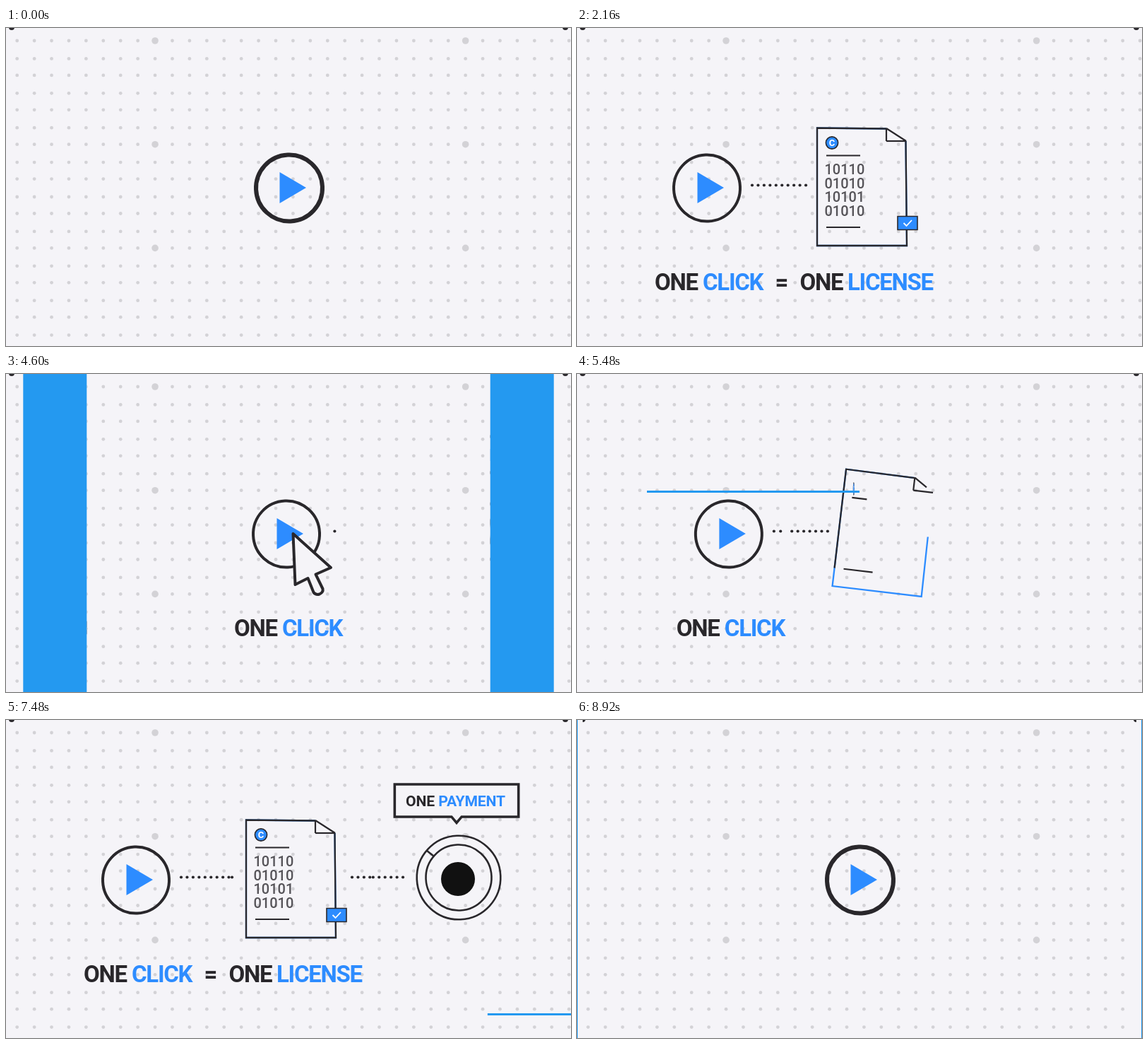
Recreate the animation shown at these times as an HTML page with a canvas. Size 800 px wide and 450 px high, loop 8960 ms.

```html
<!DOCTYPE html>
<html lang="en">
<head>
<meta charset="utf-8">
<title>One click</title>
<style>
html, body { margin: 0; width: 800px; height: 450px; overflow: hidden; background: #f5f4f8 }
canvas { display: block }
</style>
</head>
<body>
<canvas id="stage" width="800" height="450"></canvas>
<script>
const c = document.getElementById('stage').getContext('2d');
const LOOP = 8960, CYCLE = 4000, WIPE = 3910;
const BG = '#f5f4f8', INK = '#29272b', BLUE = '#2d8cff', BAR = '#2499f0', GREY = '#d3d2d6';

const clamp = (v, a = 0, b = 1) => Math.min(b, Math.max(a, v));
const span = (t, from, to) => clamp((t - from) / (to - from));
const quad = u => u < .5 ? 2 * u * u : 1 - 2 * (1 - u) ** 2;
const out = u => 1 - (1 - u) ** 3;

function disc(x, y, r, color) {
  c.fillStyle = color;
  c.beginPath();
  c.arc(x, y, r, 0, 7);
  c.fill();
}

function trace(points) {
  c.beginPath();
  points.forEach(p => c.lineTo(...p));
}

function stroke(width, color = INK) {
  c.lineWidth = width;
  c.strokeStyle = color;
  c.stroke();
}

function line(x1, y1, x2, y2, width, color) {
  if (x1 === x2 && y1 === y2) return;
  trace([[x1, y1], [x2, y2]]);
  stroke(width, color);
}

function ring(x, y, r, width, part = 1) {
  if (!part) return;
  c.beginPath();
  c.arc(x, y, r, -2.4, -2.4 + part * 2 * Math.PI);
  stroke(width);
}

function label(text, x, y, color, size = 33, gap = -1.3, weight = 700) {
  c.font = `${weight} ${size}px Roboto, sans-serif`;
  c.letterSpacing = gap + 'px';
  c.fillStyle = color;
  c.fillText(text, x, y);
}

// Runs draw in a frame moved to x, y, then scaled and turned
function at(x, y, sx, sy, angle, draw) {
  if (!sx || !sy) return;
  c.save();
  c.translate(x, y);
  c.rotate(angle);
  c.scale(sx, sy);
  draw();
  c.restore();
}

const typed = (text, u) => text.slice(0, Math.round(text.length * u));

function backdrop() {
  c.fillStyle = BG;
  c.fillRect(0, 0, 800, 450);
  for (let row = 0; row < 18; row++)
    for (let col = 0; col < 33; col++) {
      const big = row % 6 === 0 && (col === 8 || col === 26);
      const y = 18 + (row >> 1) * 48.9 + (row % 2) * 25.4;
      disc(15.7 + col * 24.42, y, big ? 4.8 : 2.4, GREY);
    }
  disc(8, -1, 4, INK);
  disc(792, -1, 4, INK);
}

// Ten dots leave the left end one by one; later a nudge runs back along them
function dots(s, x, start, nudge) {
  for (let k = 0; k < 10; k++) {
    const age = s - start - 120 * k, slot = 9 - k;
    if (age < 0) continue;
    const late = s - nudge - 30 * k;
    const shift = 4 * (span(late, 0, 30) - span(late, 210, 240));
    disc(x + Math.min(8.5 * (age / 120) ** 2, 8.45 * slot) - shift, 222.5, 2.1, INK);
  }
}

function playButton(s) {
  ring(184, 226.5, 47, 6 - 2 * span(s, 440, 520));
  trace([[170.5, 204], [208, 226], [170.5, 248]]);
  c.fillStyle = BLUE;
  c.fill();
}

function paper(s) {
  if (s < 900) return;
  const turn = 9 * (1 - quad(span(s, 1250, 1900))) * Math.PI / 180;
  at(403, 225, 1, 1, turn, () => {
    c.translate(-403, -225);
    const edge = [[438, 142.5], [340, 141.5], [340, 308], [467, 308], [465.5, 160]];
    const head = (s - 900) * .82, tail = clamp((s - 1102) * .63, 0, 540);
    c.lineJoin = 'miter';
    trace(edge);
    c.setLineDash([clamp(head, 0, 540), 999]);
    stroke(2.3, BLUE);
    if (tail) {
      trace(edge);
      c.setLineDash([tail, 999]);
      stroke(2.3);
    }
    c.setLineDash([]);
    const fold = span(s, 1150, 1400), slant = span(s, 1300, 1580);
    line(438, 142, 438, 142 + 18 * fold, 2.2);
    line(438, 160, 438 + 28 * fold, 160, 2.2);
    line(438, 142, 438 + 28 * slant, 142 + 18 * slant, 2.2);
    line(353, 180.5, 353 + 48 * span(s, 1340, 1660), 180.5, 2.2);
    line(353, 282, 353 + 48 * span(s, 1240, 1520), 282, 2.2);
    ['10110', '01010', '10101', '01010'].forEach((row, i) =>
      label(typed(row, span(s, 1560 + 70 * i, 1800 + 70 * i)), 350.5, 207.2 + 19.5 * i, '#555358', 20, 0, 500));
  });

  at(361, 162.5, out(span(s, 1470, 1750)), 1, 0, () => {
    disc(0, 0, 8.6, BLUE);
    c.beginPath();
    c.arc(0, 0, 8.6, 0, 7);
    stroke(1.6);
    label('C', -4.3, 4.6, '#fff', 13, 0);
  });

  const pop = out(span(s, 1850, 2080));
  at(468, 276, pop, pop, 0, () => {
    c.fillStyle = BLUE;
    c.fillRect(-14, -9.5, 28, 19);
    c.beginPath();
    c.rect(-14, -9.5, 28, 19);
    stroke(1.6);
    trace([[-5.5, 0], [-1.5, 4], [6, -4]]);
    stroke(1.8, '#fff');
  });
}

function coin(s) {
  ring(641, 223, 59.3, 2.6, quad(span(s, 2460, 2760)));
  ring(641, 223, 46.5, 2.6, quad(span(s, 2520, 2800)));
  const u = out(span(s, 2620, 2800));
  line(596, 185, 596 + 10 * u, 185 + 8 * u, 2.6);
  at(640, 225, u, u, 0, () => disc(0, 0, 24, '#111'));
}

function bubbleScale(s) {
  const x = s - 2820;
  if (x < 0) return clamp(x / 120 + 1);
  return x > 880 ? 1 : 1 + .29 * Math.exp(-.0016 * x) * Math.sin(2 * Math.PI * x / 880);
}

function bubble(s) {
  const k = bubbleScale(s);
  at(638, 114, k, k, 0, () => {
    trace([[-97.5, -25.5], [97.5, -25.5], [97.5, 25.5], [8, 25.5], [0, 35], [-8, 25.5], [-97.5, 25.5]]);
    c.closePath();
    c.fillStyle = BG;
    c.fill();
    c.lineJoin = 'miter';
    stroke(4);
    label('ONE', -80, 9, INK, 23.5, -.2);
    label('PAYMENT', -28.5, 9, BLUE, 23.5, -.2);
  });
}

function cursor(s) {
  const away = 1 - out(span(s, 20, 430)) + quad(span(s, 640, 1150));
  if (away >= 1) return;
  const press = 1 - .1 * Math.sin(Math.PI * span(s, 430, 560));
  at(406.5 + 410 * away, 226 + 34 * away, press, press, 0, () => {
    c.beginPath();
    [[0, 0], [53.5, 48], [32, 57.5], [42, 78]].forEach(p => c.lineTo(...p));
    c.quadraticCurveTo(43, 83, 37.5, 85.5);
    c.quadraticCurveTo(32, 87, 29, 83);
    [[21, 63], [3, 72]].forEach(p => c.lineTo(...p));
    c.closePath();
    c.fillStyle = BG;
    c.fill();
    c.lineJoin = 'round';
    stroke(4);
  });
}

function streaks(s) {
  const head = 400 * quad(span(s, 1100, 1380)), tail = 400 * span(s, 1382, 1782);
  line(tail, 166.5, head, 166.5, 2.8, BAR);
  const far = (s - 2440) * .85 + 8;
  if (far > 0 && far < 1020) line(Math.max(0, far - 211), 416.5, far, 416.5, 2.8, BAR);
}

function scene(s) {
  backdrop();
  c.save();
  c.translate(217 * (1 - quad(span(s, 469, 1849))), 0);
  dots(s, 248, 515, 3450);
  playButton(s);
  label(typed('ONE', span(s, 260, 380)), 110, 371, INK);
  label(typed('CLICK', span(s, 360, 540)), 178, 371, BLUE);
  paper(s);
  c.restore();
  if (s > 1740) label('=', 280.5, 371, INK);
  label(typed('ONE', span(s, 1760, 1880)), 315.5, 371, INK);
  label(typed('LICENSE', span(s, 1860, 2080)), 383, 371, BLUE);
  dots(s, 490, 2230, 3300);
  coin(s);
  bubble(s);
  streaks(s);
  cursor(s);
}

// Two bars part from the middle and uncover the next scene
function wipe(age, next) {
  const u = clamp((age - 90) / 920);
  const inner = 1 + 398 * (u + .07 * Math.sin(Math.PI * u));
  const width = clamp(age * .49, 0, 90);
  c.save();
  c.beginPath();
  c.rect(400 - inner, 0, 2 * inner, 450);
  c.clip();
  scene(next);
  c.restore();
  if (inner > 398.5) {
    c.fillStyle = BG;
    c.fillRect(0, 0, 8, 450);
    c.fillRect(792, 0, 8, 450);
  }
  c.fillStyle = BAR;
  c.fillRect(400 - inner - width, 0, width, 450);
  c.fillRect(400 + inner, 0, width, 450);
}

function draw(t) {
  const second = t >= WIPE + 1100;
  const s = second ? t - CYCLE : t;
  scene(s);
  if (s > WIPE) wipe(s - WIPE, second ? 0 : Math.max(0, t - CYCLE));
}

function tick() {
  draw(performance.now() % LOOP);
  requestAnimationFrame(tick);
}
tick();
</script>
</body>
</html>
```
